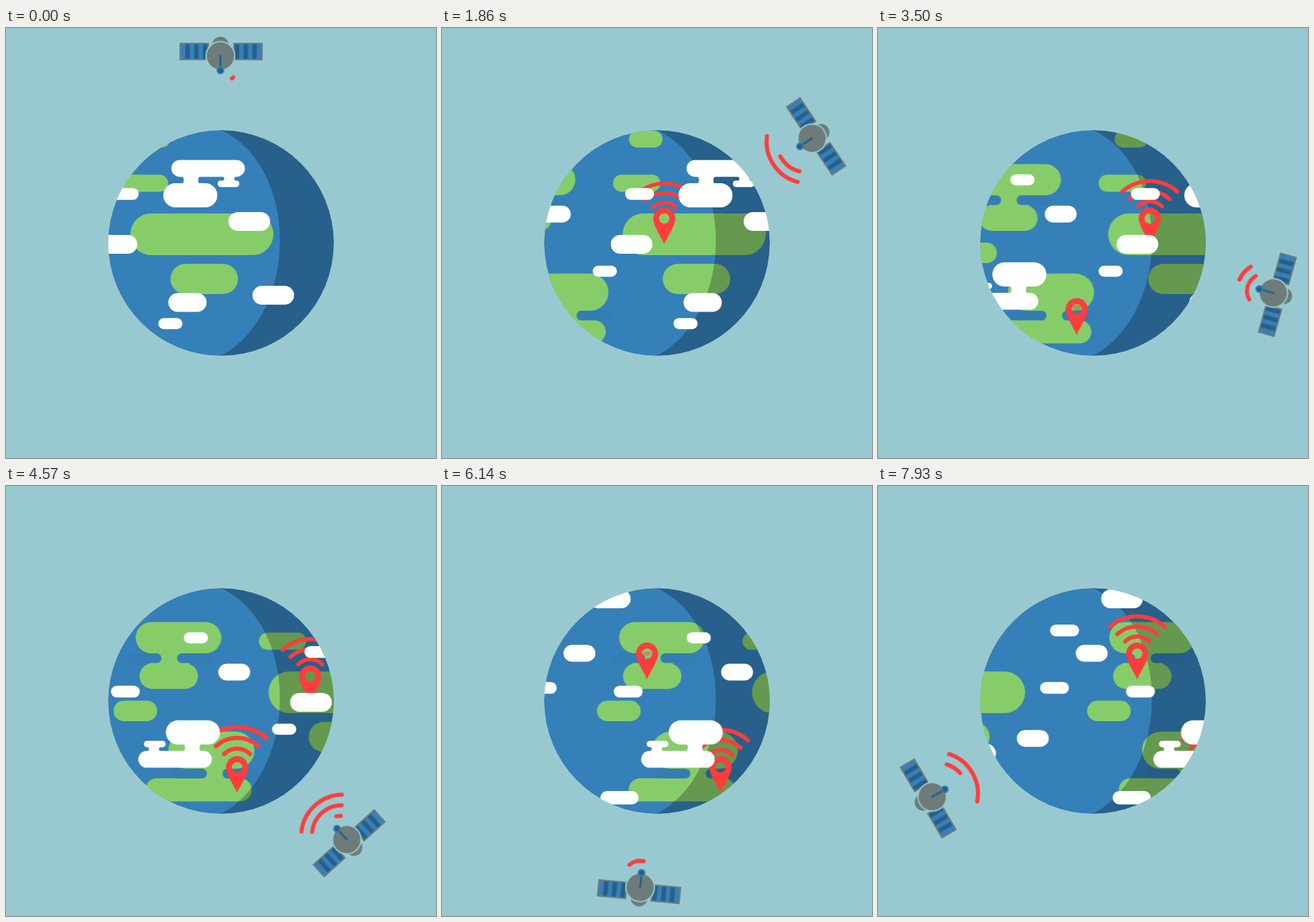
These frames come from a looping animation (640x640 px, 8 s). An HTML page:

```html
<!DOCTYPE html>
<html lang="en">
<head>
<meta charset="utf-8">
<title>Satellite around the Earth</title>
<style>
  html, body { margin: 0; height: 100%; overflow: hidden; background: #99c9d0; }
  svg { display: block; width: 100vw; height: 100vh; }
  .land { fill: #86cd6a; }
  .inlet { fill: #337db4; }
  .land, .pins { animation: land 8s linear infinite; }
  .clouds { fill: #fff; animation: clouds 8s linear infinite; }
  #orbit { transform-origin: 320px 320px; animation: orbit 8s linear infinite; }
  .wave { fill: none; stroke: #fd3d3d; stroke-width: 6; stroke-linecap: round; }
  .pin { fill: #fd3d3d; fill-rule: evenodd; }
  @keyframes land { to { transform: translateX(360px); } }
  @keyframes clouds { to { transform: translateX(507px); } }
  @keyframes orbit { to { transform: rotate(241.5deg); } }
</style>
</head>
<body>
<svg viewBox="0 0 640 640">
  <clipPath id="globe"><circle cx="320" cy="320" r="168"/></clipPath>
  <g clip-path="url(#globe)">
    <circle cx="320" cy="320" r="168" fill="#3580b8"/>
    <g class="land"><g id="land"/><use href="#land" x="-536"/></g>
    <path d="M320 152C437 206 437 425 320 488A168 168 0 0 0 320 152Z" opacity=".25"/>
    <g class="pins" id="pins"/>
    <g class="clouds"><g id="clouds"/><use href="#clouds" x="-756"/></g>
  </g>
  <g id="orbit">
    <g id="panel" stroke="#6d7c7a" stroke-width="2.2">
      <path d="M259.2 23.2h41.6v23.6h-41.6Z" fill="#3580b8"/>
      <path d="M270.2 24.3v21.4m13 -21.4v21.4m13 -21.4v21.4" stroke="#285f89" stroke-width="6.5"/>
    </g>
    <use href="#panel" transform="translate(640 0) scale(-1 1)"/>
    <g fill="#6d7c7a">
      <circle cx="319" cy="25.5" r="12.5"/>
      <circle cx="319" cy="41.5" r="21.3" stroke="#99c9d0" stroke-width="2"/>
    </g>
    <path d="M319 41.5V60" stroke="#285f89" stroke-width="3" stroke-linecap="round"/>
    <circle cx="319" cy="63.2" r="4.8" fill="#285f89" stroke="#3580b8" stroke-width="2"/>
    <g id="signal" transform="translate(320 63.2)"/>
  </g>
</svg>
<script>
const LOOP = 8000;
const SIGNAL_PERIOD = 2980;
const ERASE_LAG = 1335;
const DRAW_PACE = 12.2; // ms per unit of arc radius

const byId = id => document.getElementById(id);

function add(parent, tag, attrs) {
  const el = document.createElementNS('http://www.w3.org/2000/svg', tag);
  for (const key in attrs) el.setAttribute(key, attrs[key]);
  return parent.appendChild(el);
}

function pill(parent, cx, cy, width, height, attrs) {
  add(parent, 'rect', { x: cx - width / 2, y: cy - height / 2, width, height, rx: height / 2, ...attrs });
}

// Two pills of land, joined across a strait with an inlet on either side
function continent(x, y, drawPills) {
  drawPills(land);
  add(land, 'rect', { x: x - 30, y: y - 16, width: 60, height: 32 });
  for (const side of [-1, 1]) pill(land, x + side * 37.6, y, 52, 14.5, { class: 'inlet' });
}

const land = byId('land');
pill(land, 291.5, 307, 213, 62);
pill(land, 295, 373.5, 100.5, 45);
pill(land, 206, 231, 70.5, 25.5);
pill(land, 219.5, 165.5, 50, 25);
pill(land, -13.2, 334.8, 65, 30.5);
continent(104.8, 428, g => {
  pill(g, 100, 393.3, 128, 55.5);
  pill(g, 80.7, 452.3, 158.5, 34.5);
});
continent(37.2, 256.3, g => {
  pill(g, 51, 225.7, 127.5, 46.5);
  pill(g, 36.5, 283, 87, 38);
});

// Joint between two clouds, flared at both ends
function neck(parent, cx, width, y0, y1) {
  const x0 = cx - width / 2, x1 = cx + width / 2, m = (y0 + y1) / 2, f = 4;
  add(parent, 'path', {
    d: `M${x0 - f} ${y0}Q${x0} ${y0} ${x0} ${m}Q${x0} ${y1} ${x0 - f} ${y1}` +
       `H${x1 + f}Q${x1} ${y1} ${x1} ${m}Q${x1} ${y0} ${x1 + f} ${y0}Z`
  });
}

function cluster(x, y, turn) {
  const g = add(clouds, 'g', { transform: `translate(${x} ${y}) rotate(${turn})` });
  pill(g, 0, 0, 109.5, 25);
  pill(g, -26.5, 40, 80.5, 36);
  pill(g, 30.3, 22.8, 32.3, 9.7);
  neck(g, -25.5, 21.5, 12, 23);
  neck(g, 31.5, 15, 12, 18.5);
}

function scatter(width, height, ...centres) {
  for (const [x, y] of centres) pill(clouds, x, y, width, height);
}

const clouds = byId('clouds');
cluster(300.7, 209, 0);
cluster(-38, 406.8, 180);
scatter(36, 16.3, [244.5, 440], [124.3, 362], [-7, 226]);
scatter(43, 17.5, [176, 247], [-112, 306], [-225, 215], [-240, 300.5]);
scatter(47.5, 25, [50, 277], [-184.6, 249], [-272.3, 375.7]);
scatter(62, 28, [362, 288], [397.7, 397.8], [164.2, 322], [-139.5, 168]);
scatter(57, 28, [270, 408.5]);
scatter(57, 20, [-125, 464]);

// Three growing arcs; the middle one runs the other way
function waves(parent) {
  return [0, 1, 2].map(i => {
    const reach = 18 + 11.5 * i, sag = 7.5 + 4 * i, y = 10.3 + 11 * i;
    const radius = (reach * reach + sag * sag) / (2 * sag);
    const x = i === 1 ? -reach : reach;
    const path = add(parent, 'path', {
      class: 'wave', pathLength: 1,
      d: `M${x} ${y}A${radius} ${radius} 0 0 ${i === 1 ? 0 : 1} ${-x} ${y}`
    });
    return { path, duration: radius * DRAW_PACE };
  });
}

// Each arc starts where the one before ends
const signal = waves(byId('signal'));
let nextStart = -20;
for (const arc of signal) {
  arc.path.setAttribute('stroke-dasharray', '1 2');
  arc.start = nextStart;
  nextStart += arc.duration;
}

function makePin(x, y, start) {
  const body = add(add(byId('pins'), 'g', { transform: `translate(${x} ${y})` }), 'g');
  const rings = add(body, 'g');
  waves(add(rings, 'g', { transform: 'translate(0 -46.2) scale(1 -1)' }));
  add(body, 'path', {
    class: 'pin',
    d: 'M0 0C-3 -9 -16.5 -27 -16.5 -38.5A16.5 16.5 0 1 1 16.5 -38.5C16.5 -27 3 -9 0 0Z' +
       'M-7.8 -38.5a7.8 7.8 0 1 0 15.6 0a7.8 7.8 0 1 0 -15.6 0Z'
  });
  return { body, rings, start };
}

const pins = [makePin(247, 322, 300), makePin(138.2, 457, 2480), makePin(28.8, 288, 5160)];

const clamp = v => Math.min(1, Math.max(0, v));
const smooth = v => { const p = clamp(v); return p * p * (3 - 2 * p); };
// Grow to 1.1, then settle at 1
const pop = (time, rise) => 1.1 * smooth(time / rise) - 0.1 * smooth((time - rise) / (rise * 0.6));

function show(el, scale, transform) {
  el.setAttribute('visibility', scale > 0 ? 'inherit' : 'hidden');
  el.setAttribute('transform', transform);
}

function render(t) {
  const phase = t % SIGNAL_PERIOD;
  for (const { path, start, duration } of signal) {
    const drawn = clamp((phase - start) / duration);
    const erased = clamp((phase - ERASE_LAG - start) / duration);
    path.setAttribute('visibility', drawn > 0 && erased < 1 ? 'visible' : 'hidden');
    path.setAttribute('stroke-dashoffset', 1 - drawn - erased);
  }
  for (const { body, rings, start } of pins) {
    const size = pop(t - start, 500), spread = pop(t - start - 710, 1100);
    show(body, size, `rotate(${25 * (1 - Math.min(1, size))}) scale(${size})`);
    show(rings, spread, `translate(0 -32) scale(${spread}) translate(0 32)`);
  }
}

// Share the clock of the orbit keyframes
const clock = byId('orbit').getAnimations()[0];
function tick() {
  render((clock.currentTime || 0) % LOOP);
  requestAnimationFrame(tick);
}
tick();
</script>
</body>
</html>
```
